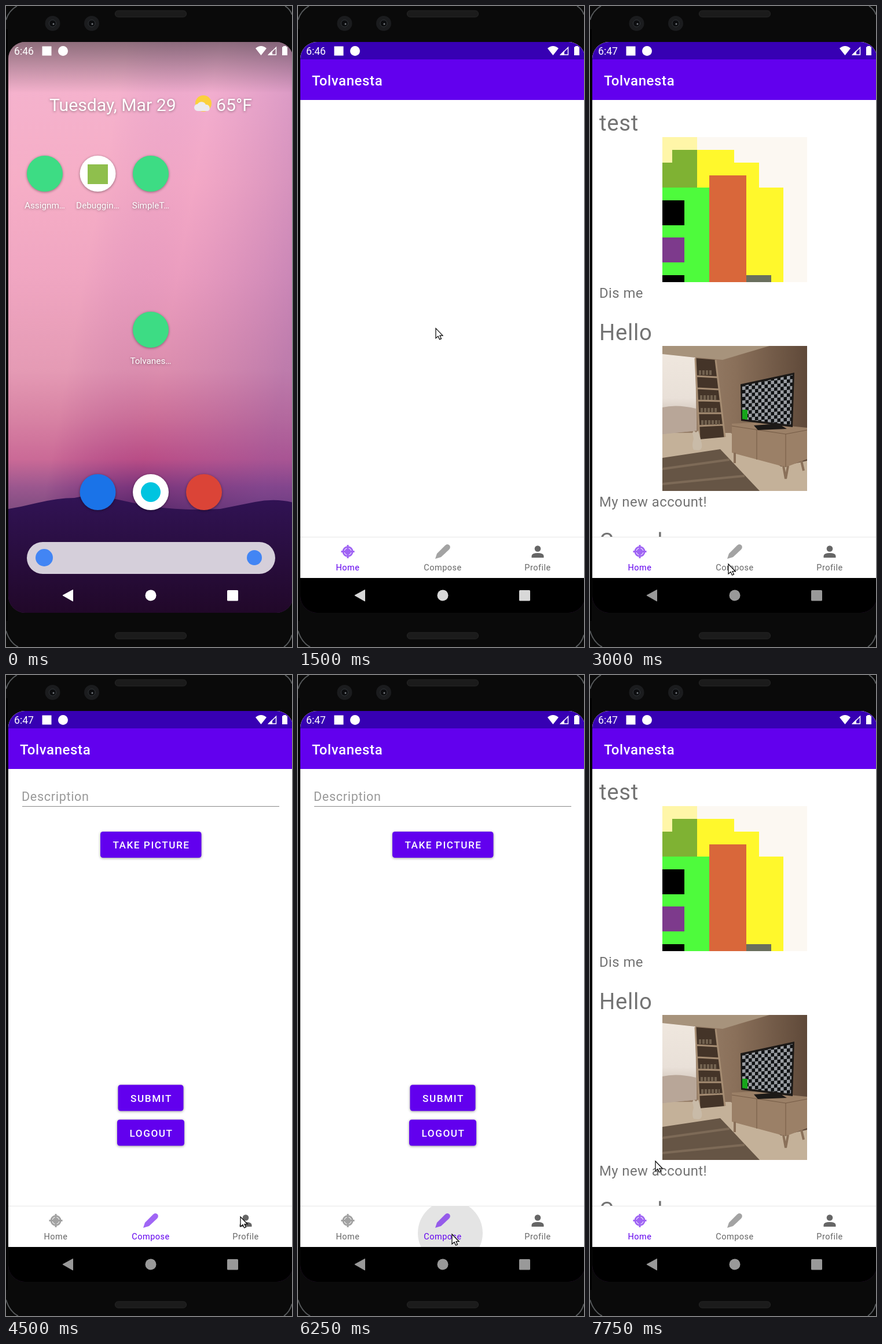
Recreate the animation shown at these times as an HTML page. Size 494 by 1105 pixels, loop 8000 ms.

```html
<!DOCTYPE html>
<html lang="en">
<meta charset="utf-8">
<title>Phone demo</title>
<style>
  html, body { margin: 0; width: 100%; height: 100%; overflow: hidden; background: #000 }
  svg { display: block; font-family: Roboto, sans-serif }
  .mid { text-anchor: middle }
  .white { fill: #fff }
  .shadow { filter: drop-shadow(0 1px 2px #0006) }
  .small { font-size: 15.3px }
  .date { font-size: 30.2px }
  .name { font-size: 38.3px; letter-spacing: .0178em; fill: #737373 }
  .caption { font-size: 23.9px; letter-spacing: .0178em; fill: #737373 }
  .button rect { fill: #6200ee }
  .button text { font-size: 17.2px; font-weight: 500; letter-spacing: .0893em; fill: #fff }
  .tab { color: #666; fill: currentColor; font-size: 14.5px; letter-spacing: .033em }
  .tab.on { color: #6200ee }
</style>
<svg width="494" height="1105" viewBox="0 0 494 1105">
  <defs>
    <clipPath id="screen"><rect x="4" y="62" width="492" height="984" rx="29"/></clipPath>
    <clipPath id="content"><rect x="4" y="162" width="492" height="753"/></clipPath>
    <clipPath id="tabBar"><rect x="4" y="916" width="492" height="70"/></clipPath>
    <clipPath id="window"><rect x="46" y="174" width="408" height="762" rx="27"/></clipPath>
    <linearGradient id="sky" gradientUnits="userSpaceOnUse" x1="0" y1="62" x2="0" y2="870">
      <stop offset="0" stop-color="#f1b0d3"/>
      <stop offset=".3" stop-color="#f3a8c6"/>
      <stop offset=".5" stop-color="#eb9dbf"/>
      <stop offset=".7" stop-color="#dc8eae"/>
      <stop offset=".8" stop-color="#cb6f98"/>
      <stop offset=".89" stop-color="#b94d86"/>
      <stop offset=".95" stop-color="#79347b"/>
      <stop offset="1" stop-color="#552668"/>
    </linearGradient>
    <linearGradient id="dusk" x1="0" y1=".3" x2="1" y2=".6">
      <stop offset=".3" stop-color="#ffc0c8" stop-opacity=".25"/>
      <stop offset=".6" stop-color="#b070b0" stop-opacity="0"/>
      <stop offset="1" stop-color="#9060a8" stop-opacity=".4"/>
    </linearGradient>
    <linearGradient id="hill" x1="0" y1="0" x2="0" y2="1">
      <stop stop-color="#311355"/><stop offset="1" stop-color="#210829"/>
    </linearGradient>
    <linearGradient id="scrim" x1="0" y1="0" x2="0" y2="1">
      <stop stop-color="#282828" stop-opacity=".5"/><stop offset="1" stop-color="#282828" stop-opacity="0"/>
    </linearGradient>
    <linearGradient id="wall">
      <stop stop-color="#a18a74"/><stop offset=".5" stop-color="#8a705a"/><stop offset="1" stop-color="#5f4939"/>
    </linearGradient>
    <linearGradient id="daylight" x1="0" y1="0" x2="0" y2="1">
      <stop stop-color="#efe7de"/><stop offset=".55" stop-color="#e9e0d8"/><stop offset="1" stop-color="#b5a597"/>
    </linearGradient>
    <pattern id="check" width="11" height="12" patternUnits="userSpaceOnUse" patternTransform="matrix(1 -.08 0 1 138 70)">
      <path fill="#101214" d="M0 0h11v12H0z"/>
      <path fill="#9a9da2" d="M0 0h5.5v6H0zM5.5 6H11v6H5.5z"/>
    </pattern>
  </defs>

  <rect width="494" height="1105" fill="#0a0a0a"/>
  <path d="M0 24Q5 8 19 0M0 1077Q6 1097 21 1105M494 1084Q490 1098 480 1105M482 0Q491 6 494 15" fill="none" stroke="#55585a" stroke-width="2"/>
  <path d="M0 40V1060" stroke="#000" stroke-width="6"/>
  <g fill="#1b1b1b" stroke="#262626">
    <rect x="188.500" y="8" width="123" height="11" rx="5"/>
    <rect x="188.500" y="1080" width="123" height="11" rx="5"/>
  </g>
  <g fill="#1b1c1e">
    <circle cx="80.500" cy="30" r="13"/><circle cx="148" cy="30" r="13"/>
    <g fill="#0c0d0f" stroke="#33373b"><circle cx="80.500" cy="30" r="6"/><circle cx="148" cy="30" r="6"/></g>
    <g fill="#767b80"><circle cx="82" cy="31" r="1.500"/><circle cx="149" cy="31" r="1.500"/></g>
  </g>

  <g clip-path="url(#screen)">
    <g id="wallpaper">
      <path fill="url(#sky)" d="M4 62H496V1046H4z"/>
      <path fill="url(#dusk)" d="M4 62H496V870H4z"/>
      <path fill="url(#hill)" d="M4 867Q28 863 52 857Q90 848 118 848Q155 840 185 849L240 861Q300 871 370 867L430 855Q465 848 496 856V1046H4z"/>
      <path id="topScrim" fill="url(#scrim)" d="M4 62H496V150H4z"/>
    </g>

    <g id="home">
      <g class="white shadow date"><text x="75" y="181">Tuesday, Mar 29</text><text x="363" y="181">65°F</text></g>
      <circle cx="341" cy="168" r="14" fill="#fbd03d"/>
      <path d="M331 181a6 6 0 0 1 0-12a8 8 0 0 1 14 1a6 6 0 0 1 4 11z" fill="#eceaf0"/>
      <g class="shadow">
        <g fill="#3ddc84"><circle cx="67" cy="289" r="31"/><circle cx="250" cy="289" r="31"/><circle cx="250" cy="558" r="31"/></g>
        <circle class="white" cx="158.500" cy="289" r="31"/>
        <circle cx="158.500" cy="838" r="31" fill="#1a73e8"/>
        <circle class="white" cx="250" cy="838" r="31"/>
        <circle cx="342" cy="838" r="31" fill="#db4437"/>
      </g>
      <rect x="141" y="273" width="35" height="34" fill="#8fbf4d"/>
      <circle cx="250" cy="838" r="17" fill="#00c4e0"/>
      <g class="white small mid shadow">
        <text x="67" y="349">Assignm…</text><text x="158.500" y="349">Debuggin…</text>
        <text x="250" y="349">SimpleT…</text><text x="250" y="617">Tolvanes…</text>
      </g>
      <rect x="36" y="924" width="429" height="55" rx="27.500" fill="#d5cfda"/>
      <circle cx="66" cy="951" r="15" fill="#4285f4"/>
      <circle cx="429" cy="951" r="13" fill="#4285f4"/>
    </g>

    <g id="launch" clip-path="url(#window)">
      <path class="white" d="M46 174H454V936H46z"/><path fill="#3700b3" d="M46 174H454V199H46z"/>
    </g>

    <g id="app">
      <path class="white" d="M4 62H496V986H4z"/>
      <path fill="#3700b3" d="M4 62H496V92H4z"/>
      <path fill="#6200ee" d="M4 92H496V162H4z"/>
      <path d="M4 986H496V1046H4z"/>
      <text class="white" x="24" y="137" font-size="24" font-weight="500" letter-spacing=".6">Tolvanesta</text>

      <g id="feed" clip-path="url(#content)">
        <text class="name" x="16" y="215">test</text>
        <g transform="translate(125 226)">
          <path fill="#fcf8f2" d="M0 0H250V250H0z"/>
          <path fill="#fff6a8" d="M0 0H60V44H0z"/>
          <path fill="#fff82c" d="M60 22H124V44H167V87H209V250H60z"/>
          <path fill="#7fb233" d="M17 22H60V87H0V44H17z"/>
          <path fill="#4efb3c" d="M0 87H81V250H0z"/>
          <path fill="#d9673a" d="M81 66H145V250H81z"/>
          <path d="M0 109H38V152H0zM0 238H38V250H0z"/>
          <path fill="#7d3a8c" d="M0 173H38V216H0z"/>
          <path fill="#6a6f5e" d="M145 238H188V250H145z"/>
        </g>
        <text class="caption" x="16" y="503">Dis me</text>

        <g id="olderPosts">
          <text class="name" x="16" y="576">Hello</text>
          <g transform="translate(125 586)">
            <path fill="url(#wall)" d="M0 0H250V250H0z"/>
            <path fill="#a7937c" d="M0 0H185L104 24L0 14z"/>
            <path fill="#c4b199" d="M0 150L118 150L205 208L250 198V250H0z"/>
            <path fill="url(#daylight)" d="M0 14L57 20L59 146L0 152z"/>
            <path fill="#b8a698" d="M0 106Q25 100 58 108V146L0 152z"/>
            <path fill="#443428" d="M57 21L92 24L108 157L64 161z"/>
            <path stroke="#a58c72" stroke-width="3" fill="none" d="M57 21L64 161M92 24L108 157M58 52L95 54M60 73L98 75M61 94L101 95M62 116L103 116M63 138L105 136"/>
            <path stroke="#71614f" stroke-width="8" stroke-dasharray="4 2" d="M63 46H86M65 89H94M66 111H96M67 132H99"/>
            <path fill="#665545" d="M0 193L100 178L168 250H0z"/>
            <path stroke="#7d6a57" stroke-width="4" d="M0 212L116 196M0 238L142 224"/>
            <path fill="#9b8067" d="M120 134L160 132L250 141V195L213 209L120 184z"/>
            <path stroke="#745a45" fill="none" d="M120 138L213 152L250 145M213 152V209M163 145V196"/>
            <path stroke="#8a7059" stroke-width="4" d="M125 184V202M209 207L213 229M217 207L213 229M240 198L244 215"/>
            <path fill="#1c1917" d="M135 66L228 46L225 140L136 129zM158 137L200 134L215 143L165 145z"/>
            <path fill="url(#check)" d="M138 69L225 50L222 136L138 126z"/>
            <path fill="#16a51a" d="M138 110H147V127L138 126z"/>
            <path fill="#c9bba8" d="M52 150L54 146L58 149L62 146L64 153L68 168Q70 179 62 180L54 179Q50 172 54 160z"/>
          </g>
          <text class="caption" x="16" y="863">My new account!</text>
          <text class="name" x="16" y="936">Coved</text>
        </g>
      </g>

      <g id="compose">
        <text x="27" y="217" font-size="21.600" letter-spacing=".67" fill="#999">Description</text>
        <path stroke="#888" stroke-width="1.200" d="M28 226.500H472"/>
        <g class="button mid">
          <g class="shadow">
            <rect x="163" y="270" width="174.500" height="45" rx="4.500"/>
            <rect x="193.500" y="706.500" width="113" height="45" rx="4.500"/>
            <rect x="192" y="766.500" width="116" height="45" rx="4.500"/>
          </g>
          <text x="251" y="299">TAKE PICTURE</text><text x="251" y="736">SUBMIT</text><text x="251" y="796">LOGOUT</text>
        </g>
      </g>

      <g id="tabs">
        <path class="white" d="M4 915H496V986H4z"/>
        <path stroke="#e6e6e6" d="M4 915.500H496"/>
        <circle id="ripple" r="56" fill="#e4e4e4" clip-path="url(#tabBar)"/>
        <g class="tab mid">
          <g opacity=".6" fill="none" stroke="currentColor" stroke-width="3">
            <circle cx="86" cy="940.500" r="8"/><circle cx="86" cy="940.500" r="4" fill="currentColor"/>
            <path d="M86 929V952M74.500 940.500H97.500"/>
          </g>
          <text x="86" y="973">Home</text>
        </g>
        <g class="tab mid">
          <path opacity=".6" d="M237 953L240 944L254 930Q258 926 262 930Q264 934 261 937L247 950z"/>
          <text x="250" y="973">Compose</text>
        </g>
        <g class="tab mid">
          <circle cx="414" cy="935.500" r="5.300"/><path d="M403.500 951V948Q404 943 414 943T424.500 948V951z"/>
          <text x="414" y="973">Profile</text>
        </g>
      </g>
    </g>

    <g class="white">
      <text id="clock" x="14" y="84" font-size="17.600"></text>
      <rect x="62.500" y="69.500" width="16" height="16"/><circle cx="98.500" cy="77.500" r="8.500"/>
      <path d="M431 73Q440.500 65 450 73L440.500 85zM477 70.500H479V69H484V70.500H486V85H477zM452 84.500L460 76.500V84.500z"/>
      <path d="M454 84L466.500 71.500V84z" fill="none" stroke="#fff" stroke-width="1.500"/>
    </g>
    <g id="keys">
      <path d="M98 1016L115.500 1006.500V1026z" stroke="currentColor" stroke-linejoin="round"/>
      <circle cx="250" cy="1016" r="9.500"/><rect x="382" y="1007" width="19" height="18.500" rx="1.500"/>
    </g>
  </g>
  <path id="cursor" d="M0 0V17L4 13.500L6.500 19L9.500 18L7 12.500H12z" fill="#fff" stroke="#000" stroke-width="1.200"/>
</svg>
<script>
const LOOP = 8000, TICK = 250;
const $ = id => document.getElementById(id);
const show = (id, on) => $(id).style.display = on ? '' : 'none';
const tabs = document.querySelectorAll('.tab');

// time, x, y
const pointer = [
  [500, 300, 640], [750, 234, 546], [1250, 234, 546], [2000, 246, 575], [2500, 246, 760],
  [3000, 239, 962], [3500, 239, 962], [4000, 245, 955], [4500, 405, 934], [4750, 410, 950],
  [5500, 410, 950], [6000, 266, 964], [6500, 266, 964], [7000, 86, 955], [7250, 86, 955], [7750, 113, 838]
];
// time of tap, x, y
const taps = [[3500, 242, 962], [4750, 410, 955], [6250, 263, 962], [7000, 86, 955]];
// time, selected tab
const pages = [[0, 0], [3750, 1], [5000, 2], [6250, 1], [7000, 0]];

function pointerAt(t) {
  const next = pointer.findIndex(p => p[0] > t);
  if (next < 0) return pointer.at(-1).slice(1);
  const [t0, x0, y0] = pointer[next - 1], [t1, x1, y1] = pointer[next];
  const k = (t - t0) / (t1 - t0);
  return [x0 + (x1 - x0) * k, y0 + (y1 - y0) * k];
}

function draw(now) {
  const t = Math.floor(now % LOOP / TICK) * TICK;
  const opening = t === 1000, inApp = t >= 1250;
  const page = pages.findLast(p => p[0] <= t)[1];

  show('topScrim', !opening);
  show('home', !inApp);
  $('home').setAttribute('opacity', opening ? .32 : 1);
  $('home').setAttribute('transform', `translate(0 ${opening ? -50 : 0})`);
  show('launch', opening);

  show('app', inApp);
  show('tabs', t >= 1500);
  show('feed', t >= 1750 && page !== 1);
  show('olderPosts', page === 0);
  show('compose', page === 1);
  tabs.forEach((tab, i) => tab.classList.toggle('on', i === page));

  const tap = taps.find(p => p[0] === t);
  show('ripple', tap);
  if (tap) {
    $('ripple').setAttribute('cx', tap[1]);
    $('ripple').setAttribute('cy', tap[2]);
  }

  $('clock').textContent = t < 2750 ? '6:46' : '6:47';
  const keyColor = !inApp ? '#fff' : t < 2750 ? '#d8d8d8' : '#999';
  $('keys').setAttribute('fill', keyColor);
  $('keys').setAttribute('color', keyColor);

  show('cursor', t >= 500);
  if (t >= 500) $('cursor').setAttribute('transform', `translate(${pointerAt(t)})`);
  requestAnimationFrame(draw);
}
requestAnimationFrame(draw);
</script>
</html>
```
